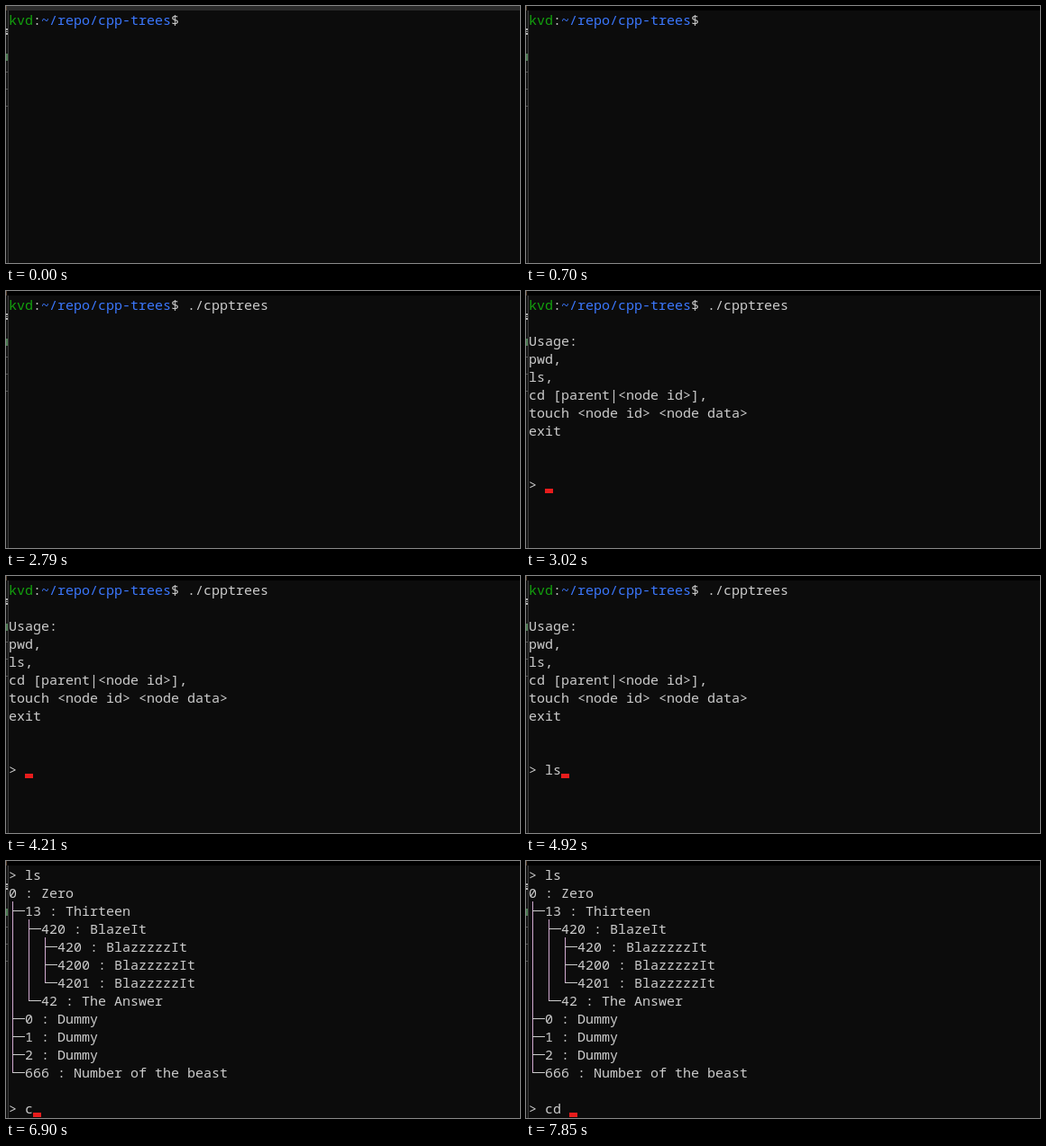
These frames come from a looping animation (570 by 286 pixels, 8000 ms). An HTML page:

```html
<!DOCTYPE html>
<html lang="en">
<head>
<meta charset="utf-8">
<title>Terminal session</title>
<style>
  html, body { margin: 0; width: 100%; height: 100%; overflow: hidden; background: #0c0c0c; }
  svg { display: block; width: 570px; height: 286px; }
  text { font: 15px "Noto Sans Mono", "DejaVu Sans Mono", monospace; fill: #ccc; white-space: pre; }
  .user { fill: #13a10e; }
  .path { fill: #3b78ff; }
</style>
</head>
<body>
<svg viewBox="0 0 570 286">
  <rect width="570" height="286" fill="#0c0c0c"/>
  <g id="edge" shape-rendering="crispEdges">
    <rect width="2" height="286" fill="#151515"/>
    <rect x="2" width="1" height="286" fill="#3c3c3c"/>
  </g>
  <rect id="bar" width="570" height="5"/>
  <rect width="1" height="5" fill="#5a4432"/>
  <g id="screen"></g>
  <rect id="cursor" width="9" height="5" fill="#e81c1c" shape-rendering="crispEdges"/>
</svg>
<script>
const LOOP = 8000, CELL = 9, LINE = 20, LEFT = 3, TOP = 5;
const NS = 'http://www.w3.org/2000/svg';
const $ = id => document.getElementById(id);
const colX = c => LEFT + c * CELL;
const rowY = r => TOP + r * LINE;

function add(parent, tag, attrs, content = '') {
  const el = document.createElementNS(NS, tag);
  for (const k in attrs) el.setAttribute(k, attrs[k]);
  el.textContent = content;
  return parent.appendChild(el);
}

const prompt = [['kvd', 'user'], [':', ''], ['~/repo/cpp-trees', 'path'], ['$ ', '']];
const usage = ['', '', 'Usage:', 'pwd,', 'ls,', 'cd [parent|<node id>],',
  'touch <node id> <node data>', 'exit', '', '', '> '];
const tree = ['> ls', '0 : Zero', '├─13 : Thirteen', '│ ├─420 : BlazeIt',
  '│ │ ├─420 : BlazzzzzIt', '│ │ ├─4200 : BlazzzzzIt', '│ │ └─4201 : BlazzzzzIt',
  '│ └─42 : The Answer', '├─0 : Dummy', '├─1 : Dummy', '├─2 : Dummy',
  '└─666 : Number of the beast', '', '> '];

// Where typed text begins on each screen
const screens = [
  { lines: [''], prompt: '', row: 0, col: 22 },
  { lines: usage, prompt: './cpptrees', row: 10, col: 2 },
  { lines: tree, prompt: null, row: 13, col: 2 }
];

// time, screen, typed text, cursor visible
const steps = [
  [0, 0, '', 0], [1160, 0, '.', 1], [1390, 0, './', 1], [1620, 0, './c', 1],
  [1850, 0, './cpp', 1], [2080, 0, './cpptrees ', 1], [2790, 0, './cpptrees ', 0],
  [3020, 1, '', 1], [3710, 1, '', 0], [4210, 1, '', 1], [4670, 1, 'l', 1], [4920, 1, 'ls', 1],
  [5170, 2, '', 1], [5920, 2, '', 0], [6420, 2, '', 1],
  [6900, 2, 'c', 1], [7370, 2, 'cd', 1], [7850, 2, 'cd ', 1]
];

function write(g, str, col, row, cls = '') {
  return add(g, 'text', { x: colX(col), y: rowY(row) + 16, class: cls }, str);
}

function drawBranch(g, ch, col, row) {
  const x = colX(col) + 4, y = rowY(row);
  if (ch !== '─') {
    add(g, 'rect', { x, y, width: 1, height: ch === '└' ? 11 : LINE, fill: '#d0a9cf' });
  }
  if (ch !== '│') {
    const start = ch === '─' ? colX(col) : x;
    add(g, 'rect', { x: start, y: y + 10, width: colX(col + 1) - start, height: 1, fill: '#ccc' });
  }
}

for (const s of screens) {
  s.g = add($('screen'), 'g', {});
  if (s.prompt !== null) {
    let col = 0;
    for (const [str, cls] of prompt) {
      write(s.g, str, col, 0, cls);
      col += str.length;
    }
    write(s.g, s.prompt, col, 0);
  }
  s.lines.forEach((line, row) => {
    const branches = line.match(/^[├└│─ ]*/)[0];
    const g = add(s.g, 'g', { 'shape-rendering': 'crispEdges' });
    [...branches].forEach((ch, col) => ch !== ' ' && drawBranch(g, ch, col, row));
    write(s.g, line.slice(branches.length), branches.length, row);
  });
  s.typed = write(s.g, '', s.col, s.row);
}

// Slivers of the window behind, at the left edge
for (const [y, h, fill] of [[25, 2, '#aaa'], [28, 1, '#999'], [30, 2, '#bbb'], [53, 8, '#4f7d55'],
  [73, 1, '#555'], [92, 1, '#555'], [111, 1, '#555']]) {
  add($('edge'), 'rect', { x: 0, y, width: 2, height: h, fill });
}

function render(t) {
  const [, index, typed, on] = steps.filter(s => s[0] <= t).pop();
  screens.forEach((s, i) => s.g.setAttribute('display', i === index ? 'inline' : 'none'));
  const s = screens[index];
  if (s.typed.textContent !== typed) s.typed.textContent = typed;
  $('bar').setAttribute('fill', t < 700 ? '#2b2b2b' : '#000');
  $('cursor').setAttribute('x', colX(s.col + typed.length));
  $('cursor').setAttribute('y', rowY(s.row) + 15);
  $('cursor').setAttribute('visibility', on ? 'visible' : 'hidden');
}

function tick() {
  render(performance.now() % LOOP);
  requestAnimationFrame(tick);
}
tick();
</script>
</body>
</html>
```
